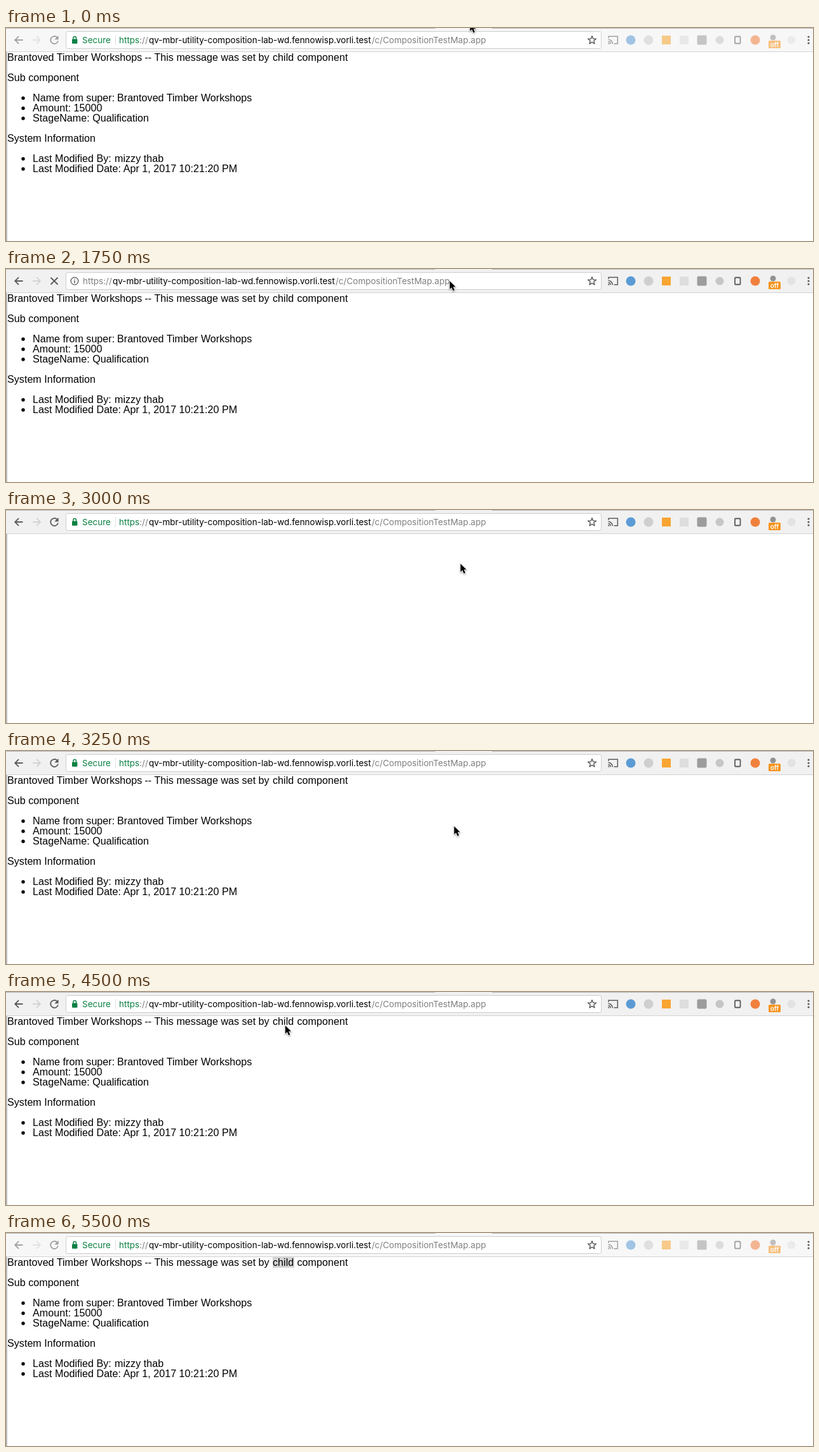
Recreate the animation shown at these times as an HTML page. Size 1271 px wide and 337 px high, loop 5.75 s.

```html
<!DOCTYPE html>
<html lang="en">
<head>
<meta charset="utf-8">
<title>Page reload</title>
<style>
  html, body { margin: 0; width: 100%; height: 100%; overflow: hidden; background: #fff; }
  svg { display: block; width: 100%; height: 100%; }
  .bar { font: 13.5px Inter, sans-serif; }
  .page { font: 16.15px "Liberation Sans", Arial, sans-serif; }
  .line { fill: none; stroke: #5a5a5a; stroke-width: 1.8; }
  .green { fill: #0b8043; }
  .grey { fill: #7f7f7f; }
  #nav, #ext { opacity: .55; }
  .active #nav, .active #ext { opacity: 1; }
  #toolbar { fill: #f7f7f7; }
  .active #toolbar { fill: #f1f1f1; }
  #mark { fill: #d4d4d4; }
  .active #mark { fill: #b3d7ff; }
  .plain #scheme { fill: #7f7f7f; }
  #card { fill: #708090; filter: drop-shadow(0 18px 11px #000); }
  #cursor { filter: drop-shadow(0 1px 1px #0006); }
</style>
</head>
<body>
<svg id="stage" viewBox="0 0 1271 337">
  <rect width="1271" height="337" fill="#fff"/>
  <rect id="toolbar" width="1271" height="37"/>
  <path d="M0 .5H676M765 .5H1271" stroke="#b4b4b4"/>
  <path d="M0 37.5H1271" stroke="#d2d2d2"/>
  <path d="M1 38V337" stroke="#a9a9a9" stroke-width="1.6"/>

  <g id="nav" class="line">
    <path d="M26.5 19H14.5M20 13.2L14.2 19L20 24.8"/>
    <path d="M42 19H54M48.2 13.2L54 19L48.2 24.8" stroke="#d2d2d2"/>
    <g id="reload">
      <path d="M80.4 14.7A6 6 0 1 0 82 20.6"/>
      <path d="M82.6 12V18.3H76.3Z" fill="#5a5a5a" stroke="none"/>
    </g>
    <path id="stop" d="M70.5 13.5L81.5 24.5M81.5 13.5L70.5 24.5"/>
  </g>

  <g class="bar">
    <rect id="field" x="94.5" y="5.5" width="843" height="27" rx="3" fill="#fff" stroke="#cdcdcd"/>
    <rect id="focus" x="95.7" y="6.7" width="840.6" height="25" rx="2.5" fill="none" stroke="#5a9fe6" stroke-width="1.7"/>
    <rect id="picked" x="178" y="10" width="579" height="18" fill="#b0d3fa"/>
    <g id="secure" class="green">
      <rect x="104" y="17.5" width="8.4" height="7.2" rx="1"/>
      <path d="M105.9 18V15.8a2.3 2.3 0 0 1 4.6 0V18" fill="none" stroke="#0b8043" stroke-width="1.4"/>
      <text x="120" y="24">Secure</text>
      <path d="M172.5 11V27" stroke="#e0e0e0"/>
    </g>
    <g id="info" class="line">
      <circle cx="108" cy="19" r="5.8" stroke-width="1.3"/>
      <path d="M108 18V22.4M108 15.4V16.8" stroke-width="1.5"/>
    </g>
    <g id="address">
      <text x="178" y="24" class="grey"><tspan id="scheme" class="green">https</tspan>://</text>
      <text x="225" y="24">qv-mbr-utility-composition-lab-wd.fennowisp.vorli.test</text>
      <text x="576" y="24" class="grey">/c/CompositionTestMap.app</text>
    </g>
    <path id="star" class="line" stroke-linejoin="round" style="stroke-width:1.4"/>
  </g>

  <g id="ext">
    <g class="line" style="stroke-width:1.5">
      <path d="M949 16V13.2H963.3V24.8H957.5"/>
      <path d="M948.5 18.3A7 7 0 0 1 955.4 25.2M948.5 21.5A3.8 3.8 0 0 1 952.2 25.2"/>
    </g>
    <path d="M948.3 25.6V23.3A2.4 2.4 0 0 1 950.6 25.6Z" fill="#5a5a5a"/>
    <circle cx="984" cy="19" r="7.5" fill="#5b9bd5"/>
    <circle cx="1012" cy="19" r="7.5" fill="#cfcfcf"/>
    <rect x="1033" y="12" width="14" height="14" fill="#f8a532"/>
    <rect x="1061" y="12" width="14" height="14" fill="#dedede"/>
    <rect x="1088.5" y="11.5" width="15" height="15" rx="2" fill="#9c9c9c"/>
    <circle cx="1124" cy="19" r="6.5" fill="#c6c6c6"/>
    <rect x="1148" y="13.5" width="8.5" height="11" rx="1" class="line"/>
    <circle cx="1180" cy="19" r="7.5" fill="#f0803c"/>
    <circle cx="1208" cy="15" r="4.5" fill="#929292"/>
    <rect x="1201" y="20" width="19" height="12" rx="1.5" fill="#f7941d"/>
    <text x="1210.5" y="29.5" text-anchor="middle" fill="#fff" style="font:600 10px Inter,sans-serif">off</text>
    <circle cx="1237" cy="19" r="6.5" fill="#e3e3e3"/>
  </g>
  <g fill="#5a5a5a">
    <circle cx="1264" cy="14" r="1.6"/><circle cx="1264" cy="19" r="1.6"/><circle cx="1264" cy="24" r="1.6"/>
  </g>

  <g id="content" class="page">
    <rect id="mark" x="420" y="38" width="34" height="17"/>
    <text y="52"><tspan x="2">Brantoved Timber Workshops</tspan><tspan x="218.5">-- This message was set by</tspan><tspan x="420">child</tspan><tspan x="458.5">component</tspan></text>
    <text x="2" y="84">Sub component</text>
    <text x="42" y="116">Name from super: <tspan x="175">Brantoved Timber Workshops</tspan></text>
    <text x="42" y="132">Amount: 15000</text>
    <text x="42" y="148">StageName: Qualification</text>
    <text x="2" y="180">System Information</text>
    <text x="42" y="212">Last Modified By: <tspan x="171">mizzy thab</tspan></text>
    <text x="42" y="228">Last Modified Date: Apr 1, 2017 10:21:20 PM</text>
    <path d="M27 111h0M27 127h0M27 143h0M27 207h0M27 223h0" stroke="#000" stroke-width="5.4" stroke-linecap="round"/>
  </g>

  <g id="loading">
    <path d="M1268.5 38V337" stroke="#ebebeb"/>
    <rect id="card" x="535" y="158.5" width="200" height="47.5" rx="4"/>
    <text x="634.5" y="189" text-anchor="middle" style="font:bold 18.72px 'Liberation Sans',Arial,sans-serif">Loading</text>
  </g>

  <path id="cursor" d="M.8 0V13L3.8 10.2L6.1 15.6L8.5 14.6L6.2 9.3H10.2Z" stroke="#fff" stroke-width="1.6" paint-order="stroke"/>
</svg>
<script>
  const LOOP = 5750;
  const el = id => document.getElementById(id);
  const show = (id, on) => { el(id).style.display = on ? "" : "none"; };

  // Pointer stops: start time, x, y
  const stops = [
    [0, 730, -8], [250, 698, 19], [2750, 709, 50], [3000, 715, 85], [3250, 705, 119],
    [3500, 615, 161], [3750, 392, 135], [4000, 365, 68], [4250, 407, 60],
    [4500, 439, 53], [5000, 524, 41]
  ];

  const starPoints = Array.from({ length: 10 }, (_, i) => {
    const r = i % 2 ? 2.9 : 6.8, a = (i / 5 - .5) * Math.PI;
    return [923 + r * Math.cos(a), 19.4 + r * Math.sin(a)];
  });
  el("star").setAttribute("d", "M" + starPoints.join("L") + "Z");

  function draw(t) {
    const during = (from, to) => t >= from && t < to;
    const focused = during(500, 1750);
    const stopping = during(1750, 3000);
    const plain = during(1750, 2500);

    el("stage").classList.toggle("active", during(500, 5500));
    el("address").classList.toggle("plain", plain);
    el("address").setAttribute("transform", `translate(${plain ? -57 : 0})`);
    show("focus", focused);
    show("picked", focused);
    show("reload", !stopping);
    show("stop", stopping);
    show("info", plain);
    show("secure", !plain);
    show("loading", during(2500, 3000));
    show("content", !during(2500, 3250));
    show("mark", t >= 4750);
    show("cursor", t < 5250);

    const [, x, y] = stops.findLast(stop => stop[0] <= t);
    el("cursor").setAttribute("transform", `translate(${x} ${y})`);
  }

  const start = performance.now();
  function tick() {
    draw((performance.now() - start) % LOOP);
    requestAnimationFrame(tick);
  }
  tick();
</script>
</body>
</html>
```
